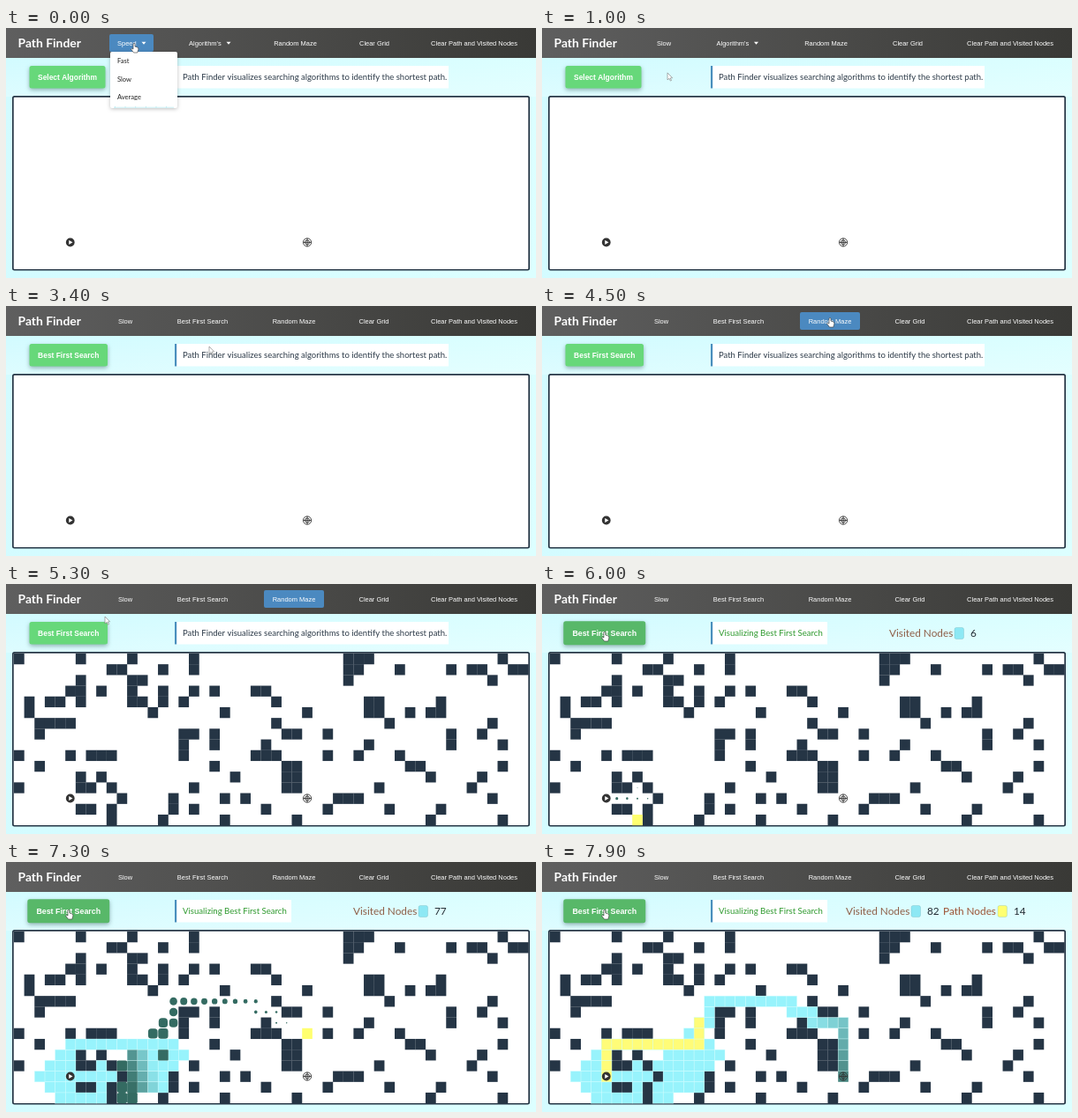
Write an HTML page with a canvas that moves like this. It is 600 px wide and 284 px high and loops after 8000 ms.

```html
<!DOCTYPE html>
<html lang="en">
<head>
<meta charset="utf-8">
<title>Path Finder</title>
<style>
html, body { margin: 0; width: 600px; height: 284px; overflow: hidden; background: #d8fdff; }
canvas { display: block; width: 600px; height: 284px; }
</style>
</head>
<body>
<canvas id="stage"></canvas>
<script>
const canvas = document.getElementById('stage');
const ctx = canvas.getContext('2d');
const ratio = window.devicePixelRatio || 1;
canvas.width = 600 * ratio;
canvas.height = 284 * ratio;

const LOOP = 8000, STEP = 100;
const LEFT = 9, TOP = 79, CW = 11.65, CH = 12.2;
const SANS = '"Liberation Sans", Arial, sans-serif';
const LATO = 'Lato, sans-serif';
const NAVY = '#253545', CYAN = '#97f3fc', YELLOW = '#ffff70';

// Wall columns for each row; a pair is an inclusive range.
const walls = [
  [0, 6, 11, 17, [32, 34], 47],
  [[9, 10], 14, 17, [32, 33], 37, 42, [44, 45], [48, 49]],
  [6, 11, 12, 32, 46],
  [[5, 6], 8, 11, 14, 17, 19, [23, 24]],
  [1, [3, 4], 6, [11, 12], 14, 16, 25, [34, 35], 41],
  [1, 13, 20, 28, [34, 35], 38, [40, 41]],
  [[2, 5], 25, 36, 46],
  [2, [16, 17], 19, [26, 27], 30, 42, 45],
  [16, 19, 24, 34, 42, 47],
  [0, 5, [7, 9], 16, [23, 25], 30, 33, 37],
  [2, 19, [26, 27], [38, 39], 47],
  [6, 8, 21, [26, 27], 40, 45],
  [0, [6, 7], 9, 17, [26, 27], 35, 44],
  [10, 15, 20, 22, 31, [32, 33], 46],
  [[6, 7], 9, 15, 17, 24, 30, 36, 41],
  [9, 14, 20, 27, 40, 47]
];

function run(list, r0, c0, r1 = r0, c1 = c0) {
  const n = Math.max(Math.abs(r1 - r0), Math.abs(c1 - c0));
  for (let i = 0; i <= n; i++)
    list.push([r0 + Math.sign(r1 - r0) * i, c0 + Math.sign(c1 - c0) * i]);
}

function searchOrder() {
  const o = [];
  run(o, 13, 5, 13, 9);
  run(o, 12, 8);
  run(o, 14, 8);
  run(o, 15, 8, 15, 6);
  for (let d = 1; d <= 3; d++)
    for (let k = -Math.min(d, 2); k <= Math.min(d, 2); k++)
      run(o, 13 + k, 5 - d + Math.abs(k));
  run(o, 10, 5, 10, 15);
  run(o, 11, 15, 11, 16);
  run(o, 12, 15, 12, 14);
  run(o, 13, 14, 14, 14);
  for (let c = 13; c > 10; c--) run(o, 11, c, 14, c);
  run(o, 11, 14);
  run(o, 15, 11);
  run(o, 12, 10);
  run(o, 14, 10, 15, 10);
  run(o, 9, 14, 9, 13);
  run(o, 8, 14, 8, 15);
  run(o, 7, 15);
  run(o, 6, 15, 6, 23);
  run(o, 7, 23, 7, 25);
  run(o, 8, 25, 8, 28);
  run(o, 9, 28, 13, 28);
  return o;
}

const order = searchOrder();
const route = [];
run(route, 13, 5, 10, 5);
run(route, 10, 6, 10, 14);
run(route, 9, 14, 8, 14);

const RATE = 38.2 / 700;
const SEARCH = 6600 - 39.4 / RATE;

// time, x, y
const moves = [
  [0, 145, 22], [200, 143, 26], [600, 136, 58], [900, 136, 58],
  [1500, 231, 16], [1900, 231, 16], [2500, 229, 57], [2900, 229, 57],
  [3400, 231, 50], [3700, 231, 50], [4300, 326, 18], [4800, 326, 18],
  [5300, 113, 41], [5600, 71, 59], [8000, 71, 59]
];

const clamp = v => Math.max(0, Math.min(1, v));
const mix = (a, b, k) => a + (b - a) * k;

function pointer(t) {
  let i = 0;
  while (i < moves.length - 2 && t >= moves[i + 1][0]) i++;
  const a = moves[i], b = moves[i + 1];
  const k = clamp((t - a[0]) / (b[0] - a[0]));
  const e = k * k * (3 - 2 * k);
  return [mix(a[1], b[1], e), mix(a[2], b[2], e)];
}

function text(s, x, y, font, color, align = 'left') {
  ctx.font = font;
  ctx.fillStyle = color;
  ctx.textAlign = align;
  ctx.fillText(s, x, y);
}

function box(x, y, w, h, r, color) {
  ctx.fillStyle = color;
  ctx.beginPath();
  ctx.roundRect(x, y, w, h, r);
  ctx.fill();
}

function shadowBox(x, y, w, h, r, color, blur, dy, shade) {
  ctx.save();
  ctx.shadowColor = shade;
  ctx.shadowBlur = blur * ratio;
  ctx.shadowOffsetY = dy * ratio;
  box(x, y, w, h, r, color);
  ctx.restore();
}

function gradient(x0, y0, x1, y1, a, b) {
  const g = ctx.createLinearGradient(x0, y0, x1, y1);
  g.addColorStop(0, a);
  g.addColorStop(1, b);
  return g;
}

function caret(x) {
  ctx.fillStyle = '#fff';
  ctx.beginPath();
  ctx.moveTo(x - 2.5, 15.7);
  ctx.lineTo(x + 2.5, 15.7);
  ctx.lineTo(x, 18.7);
  ctx.fill();
}

function navItem(s, x, align) {
  text(s, x, 19.5, '7.47px ' + SANS, '#fff', align);
}

function header(t) {
  ctx.fillStyle = gradient(0, 0, 600, 0, '#5f5f5f', '#393936');
  ctx.fillRect(0, 0, 600, 34);
  text('Path Finder', 13.5, 22, 'bold 13.9px ' + LATO, '#fff');

  const blue = '#4b89c0';
  const first = t < 900, picked = t >= 2900;
  if (first) {
    box(117, 7, 50, 20, 2, blue);
    navItem('Speed', 126);
    caret(156);
  } else {
    navItem('Slow', picked ? 135 : 138, 'center');
  }
  if (picked) {
    navItem('Best First Search', 222.5, 'center');
  } else {
    if (t >= 1500) box(189.5, 7, 64.5, 20, 2, blue);
    const x = first ? 207 : 197.5;
    navItem("Algorithm's", x);
    caret(x + 45);
  }
  if (t >= 4200 && t < 5700) box(292, 7, 68, 20, 2, blue);
  navItem('Random Maze', first ? 327.5 : picked ? 326 : 321.5, 'center');
  navItem('Clear Grid', first ? 417 : picked ? 416.5 : 414, 'center');
  navItem('Clear Path and Visited Nodes', 530, 'center');
}

function menu(x, w, items) {
  shadowBox(x, 27, w, 64, 2, '#fff', 4, 1, 'rgba(0,0,0,.25)');
  items.forEach((s, i) =>
    text(s, x + 8, 40 + i * 20.5, '7.55px ' + LATO, '#222'));
  ctx.fillStyle = '#bfeaf0';
  ctx.fillRect(x + 4, 89.8, w - 8, 0.8);
  for (let p = x + 5; p < x + w - 5; p += CW) ctx.fillRect(p, 88.8, 0.8, 2.4);
}

function infoBar(t) {
  const searching = t >= SEARCH;
  const hover = t >= 5600;
  const label = t < 2900 ? 'Select Algorithm' : 'Best First Search';
  const w = t < 2900 ? 86 : 88.5, k = hover ? 1.05 : 1;
  ctx.save();
  ctx.translate(26.5 + w / 2, 55.8);
  ctx.scale(k, k);
  shadowBox(-w / 2, -12.8, w, 25.6, 2.5, hover ? '#58b869' : '#67d87a', 5, 2, 'rgba(0,40,40,.35)');
  text(label, 0, 3, 'bold 8.43px ' + SANS, '#fff', 'center');
  ctx.restore();

  ctx.fillStyle = '#fff';
  ctx.fillRect(191, 43, searching ? 132 : 310, 25.5);
  ctx.fillStyle = '#4a8fbd';
  ctx.fillRect(191, 43, 2.2, 25.5);
  if (searching) text('Visualizing Best First Search', 200, 59.2, '9.6px ' + LATO, '#2f9a2f');
  else text('Path Finder visualizes searching algorithms to identify the shortest path.',
    200, 59.2, '9.5px ' + LATO, '#2c3a48');

  if (!searching) return;
  const tracing = t >= 7600;
  const seen = Math.min(82, Math.floor((t - SEARCH) * RATE));
  counter('Visited Nodes', tracing ? 344 : 393, 74, seen, '#8f5f48', '#8de8f4');
  if (tracing) counter('Path Nodes', 454, 62, routeCount(t), '#9c5335', YELLOW);
}

function counter(label, x, gap, n, color, swatch) {
  const font = '11.8px ' + LATO;
  text(label, x, 60, font, color);
  box(x + gap, 49.5, 10.5, 13, 2, swatch);
  ctx.strokeStyle = 'rgba(80,140,150,.3)';
  ctx.lineWidth = 0.7;
  ctx.stroke();
  text(String(n), x + gap + 18, 60, font, '#222b33');
}

function routeCount(t) {
  return Math.max(0, Math.floor((t - 7620) / 20));
}

function cell(r, c, color, k = 1, round = 0) {
  const w = CW * k, h = CH * k;
  const x = LEFT + (c + 0.5) * CW - w / 2, y = TOP + (r + 0.5) * CH - h / 2;
  box(x, y, w, h, round * w / 2, color);
}

function edge(r, c) {
  ctx.strokeStyle = 'rgba(215,255,255,.55)';
  ctx.lineWidth = 0.6;
  ctx.strokeRect(LEFT + c * CW, TOP + r * CH, CW, CH);
}

function visited(r, c, age) {
  if (age < 30) return;
  const k = clamp(age / 390);
  const f = clamp((age - 480) / 200);
  const round = age < 290 ? 1 : 1 - clamp((age - 290) / 210);
  const rgb = [[52, 151], [107, 243], [98, 252]].map(([a, b]) => Math.round(mix(a, b, f)));
  cell(r, c, `rgb(${rgb})`, k, round);
  if (f > 0.2) edge(r, c);
}

function startIcon(x, y) {
  ctx.fillStyle = '#333';
  ctx.beginPath();
  ctx.arc(x, y, 4.9, 0, 7);
  ctx.fill();
  ctx.fillStyle = '#fff';
  ctx.beginPath();
  ctx.moveTo(x - 1.5, y - 2.5);
  ctx.lineTo(x + 2.7, y);
  ctx.lineTo(x - 1.5, y + 2.5);
  ctx.fill();
}

function targetIcon(x, y) {
  ctx.strokeStyle = '#333';
  ctx.lineWidth = 0.9;
  for (const r of [4.6, 2.5]) {
    ctx.beginPath();
    ctx.arc(x, y, r, 0, 7);
    ctx.stroke();
  }
  ctx.beginPath();
  ctx.moveTo(x - 4.6, y);
  ctx.lineTo(x + 4.6, y);
  ctx.moveTo(x, y - 4.6);
  ctx.lineTo(x, y + 4.6);
  ctx.stroke();
}

function board(t) {
  box(7, 77, 586, 198.5, 2.5, NAVY);
  box(8.7, 78.7, 582.6, 195.2, 1, '#fff');

  const grow = clamp((t - 4600) / 200);
  if (grow > 0) walls.forEach((row, r) => row.forEach(v => {
    const [a, b] = Array.isArray(v) ? v : [v, v];
    for (let c = a; c <= b; c++) cell(r, c, NAVY, grow * 1.01);
  }));

  if (t >= SEARCH) {
    const pos = (t - SEARCH) * RATE;
    order.forEach(([r, c], i) => visited(r, c, (pos - i) / RATE));
    const head = order[Math.round(pos)];
    if (head) cell(head[0], head[1], YELLOW);
  }
  if (t >= 7620) route.slice(0, routeCount(t) + 1).forEach(([r, c]) => {
    cell(r, c, '#fffc78');
    edge(r, c);
  });

  const y = TOP + 13.5 * CH;
  startIcon(LEFT + 5.5 * CW - 0.3, y - 0.2);
  targetIcon(LEFT + 28.5 * CW, y - 0.2);
}

function cursor(t) {
  const [x, y] = pointer(t);
  const onNav = y < 29 && (t < 900 || t >= 1400 && t < 2900 || t >= 4200 && t < 5000);
  const hand = onNav || t >= 5600 || t >= 500 && t < 1000 || t >= 2300 && t < 2900;
  ctx.save();
  ctx.translate(x, y);
  ctx.fillStyle = '#fff';
  ctx.strokeStyle = hand ? '#333' : '#777';
  ctx.lineWidth = 0.6;
  ctx.beginPath();
  if (hand) {
    ctx.moveTo(-1, -4);
    ctx.quadraticCurveTo(0, -5.5, 1, -4);
    ctx.lineTo(1, -1);
    ctx.lineTo(4, 0);
    ctx.quadraticCurveTo(5.2, 0.5, 4.8, 2.5);
    ctx.lineTo(3.8, 6);
    ctx.lineTo(-0.5, 6);
    ctx.lineTo(-3.5, 2);
    ctx.quadraticCurveTo(-3, 0.6, -1, 2);
  } else {
    ctx.moveTo(-1, -4);
    ctx.lineTo(-1, 4);
    ctx.lineTo(1, 2.4);
    ctx.lineTo(2.4, 5.2);
    ctx.lineTo(3.5, 4.6);
    ctx.lineTo(2.2, 2);
    ctx.lineTo(4.6, 1.8);
  }
  ctx.closePath();
  ctx.fill();
  ctx.stroke();
  ctx.restore();
}

function draw(t) {
  ctx.setTransform(ratio, 0, 0, ratio, 0, 0);
  ctx.fillStyle = gradient(0, 34, 600, 284, '#d2fbff', '#dcffff');
  ctx.fillRect(0, 0, 600, 284);
  ctx.fillStyle = gradient(0, 34, 0, 78, 'rgba(255,255,255,0)', 'rgba(255,255,255,.25)');
  ctx.fillRect(0, 34, 600, 44);
  board(t);
  infoBar(t);
  header(t);
  if (t < 900) menu(118, 76, ['Fast', 'Slow', 'Average']);
  else if (t >= 1600 && t < 2900)
    menu(189.5, 83, ['Breadth First Search', 'Best First Search', 'Dijkstra']);
  cursor(t);
}

// The picture advances ten times a second.
function tick() {
  const t = performance.now() % LOOP;
  draw(Math.floor(t / STEP) * STEP);
  requestAnimationFrame(tick);
}
tick();
</script>
</body>
</html>
```
